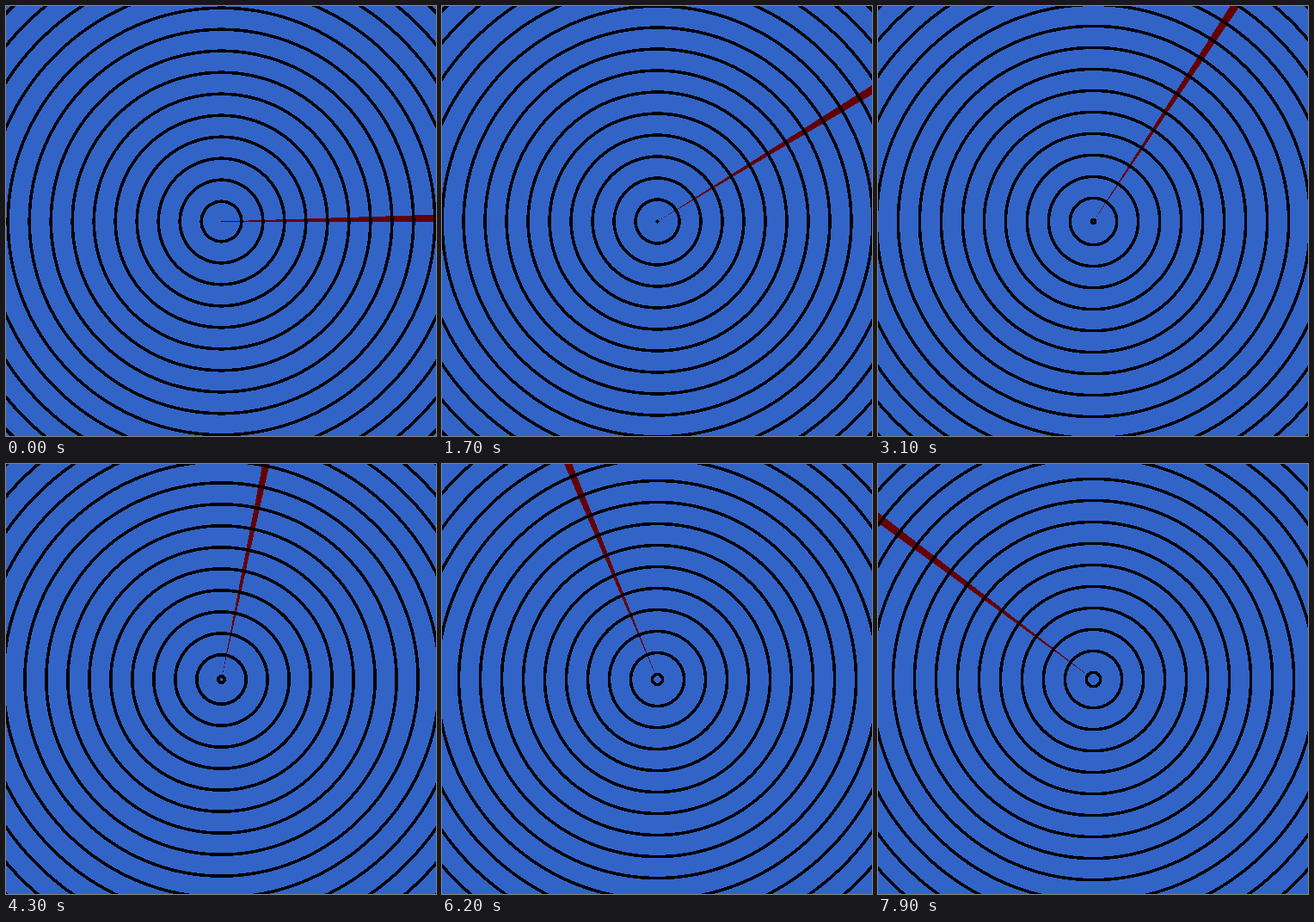
These frames come from a looping animation (500x500 px, 8000 ms). An HTML page with a canvas:

```html
<!DOCTYPE html>
<html lang="en">
<head>
<meta charset="utf-8">
<title>Radar sweep</title>
<style>
html, body { margin: 0; width: 100%; height: 100%; overflow: hidden; background: #3264c8; }
canvas { display: block; width: 100vw; height: 100vh; image-rendering: pixelated; }
</style>
</head>
<body>
<canvas id="stage" width="500" height="500"></canvas>
<script>
const SIZE = 500, MID = 250;
const STEP_MS = 100, STEPS = 80;
const GAP = 25, GROWTH = 0.125;    // ring spacing, px of growth per step
const OFFSET = -1.75, CREST = 0.9; // first ring at step 0, wave height drawn black
const BEAM = 1.8;                  // beam width and turn per step, degrees
const EPS = 1e-6;

const ctx = document.getElementById('stage').getContext('2d');
const image = ctx.createImageData(SIZE, SIZE);
const pixels = new Uint32Array(image.data.buffer);
const rgb = (r, g, b) => (255 << 24 | b << 16 | g << 8 | r) >>> 0;
const BLUE = rgb(50, 100, 200), RED = rgb(100, 0, 0), BLACK = rgb(0, 0, 0);

// Polar coordinates of every pixel around the centre
const radius = new Float64Array(SIZE * SIZE);
const angle = new Float64Array(SIZE * SIZE);
for (let y = 0, i = 0; y < SIZE; y++) {
  for (let x = 0; x < SIZE; x++, i++) {
    radius[i] = Math.hypot(x - MID, y - MID);
    angle[i] = (Math.atan2(MID - y, x - MID) * 180 / Math.PI + 360) % 360;
  }
}

function draw(step) {
  const ring = OFFSET + step * GROWTH;
  const wave = 2 * Math.PI / GAP;
  const from = step * BEAM - EPS, to = from + BEAM;
  for (let i = 0; i < pixels.length; i++) {
    if (Math.cos((radius[i] - ring) * wave) > CREST) pixels[i] = BLACK;
    else pixels[i] = angle[i] >= from && angle[i] < to ? RED : BLUE;
  }
  ctx.putImageData(image, 0, 0);
}

let shown = -1;
const start = performance.now();
function tick(now) {
  const step = Math.floor(Math.max(0, now - start) / STEP_MS) % STEPS;
  if (step !== shown) draw(shown = step);
  requestAnimationFrame(tick);
}
draw(shown = 0);
requestAnimationFrame(tick);
</script>
</body>
</html>
```
